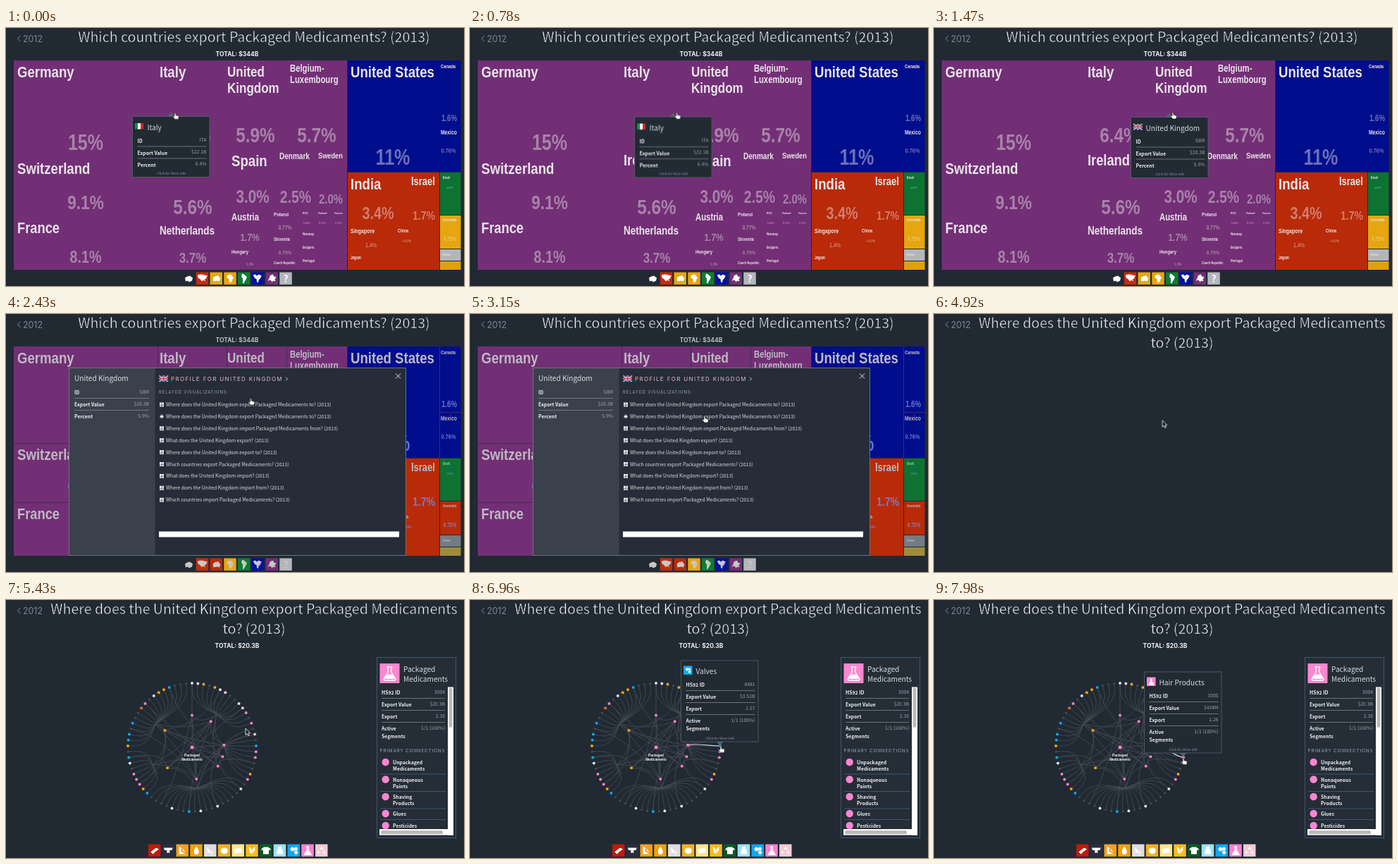
Animation of 650 by 366 pixels, one loop 8 s. Source, as an HTML page:

```html
<!DOCTYPE html>
<html lang="en">
<head>
<meta charset="utf-8">
<title>Which countries export Packaged Medicaments?</title>
<style>
  html, body { margin: 0; width: 100%; height: 100%; overflow: hidden; background: #212a33; }
  svg { display: block; width: 100vw; height: 100vh; }
  text { font-family: "Noto Sans CJK JP", "Noto Sans CJK", "Noto Sans CJK SC", sans-serif; font-weight: 300; fill: #d6dade; }
  /* a background-coloured outline slims the strokes to a light weight */
  .heading { fill: #f4f5f7; stroke: #212a33; stroke-width: .5px; }
  .bold { font-weight: 700; font-size: 6.9px; fill: #eef0f2; }
  .value { font-size: 6.8px; fill: #9ba2aa; }
  .caps { font-family: Inter, sans-serif; font-weight: 400; }
  .total { font-family: Inter, sans-serif; font-weight: 700; font-size: 8.5px; fill: #f1f2f4; }
  .cond { font-family: "Liberation Sans", Arial, sans-serif; font-weight: 700; fill: #e9e4ea; }
  #lit .cond { fill: #bdb9c2; }
  #lit .shares .cond { fill: #7d8ee6; }
  #lit .total { fill: #b9bdc2; }
  .anim { animation: 8s step-end infinite; }
  .smooth { animation: 8s linear infinite; }

  #map { animation-name: map; }
  #lit { animation-name: lit; }
  #modal { animation-name: modal; }
  #titleA { animation-name: titleA; }
  #titleB { animation-name: titleB; }
  #net { animation-name: net; }
  #tipItaly { animation-name: italy; }
  #tipUK { animation-name: uk; }
  #tipValves { animation-name: valves; }
  #tipHair { animation-name: hair; }
  #tips { animation-name: follow; }
  #cursor { animation-name: cursor; }
  #hand { animation-name: hand; }
  #arrow { animation-name: arrow; }

  @keyframes map { 0% { visibility: visible } 24.5%, 100% { visibility: hidden } }
  @keyframes lit { 0% { visibility: hidden } 24.5% { visibility: visible } 43%, 100% { visibility: hidden } }
  @keyframes modal { 0%, 24.5% { opacity: 0 } 27%, 42.99% { opacity: 1 } 43%, 100% { opacity: 0 } }
  @keyframes titleA { 0% { visibility: visible } 43%, 100% { visibility: hidden } }
  @keyframes titleB { 0% { visibility: hidden } 43%, 100% { visibility: visible } }
  @keyframes net { 0%, 62% { opacity: 0 } 66%, 100% { opacity: 1 } }
  @keyframes italy { 0% { visibility: visible } 11.4%, 100% { visibility: hidden } }
  @keyframes uk { 0% { visibility: hidden } 11.4% { visibility: visible } 24.5%, 100% { visibility: hidden } }
  @keyframes valves { 0% { visibility: hidden } 80% { visibility: visible } 92.5%, 100% { visibility: hidden } }
  @keyframes hair { 0% { visibility: hidden } 93.5%, 100% { visibility: visible } }
  @keyframes follow {
    0%, 4% { transform: translate(0, 0); animation-timing-function: ease-in-out }
    15%, 100% { transform: translate(100px, 1px) }
  }
  @keyframes cursor {
    0%, 4% { transform: translate(239px, 119.5px); animation-timing-function: ease-in-out }
    15%, 26% { transform: translate(338px, 119px); animation-timing-function: ease-in-out }
    30%, 32% { transform: translate(346.5px, 119px); animation-timing-function: ease-in-out }
    38%, 42% { transform: translate(332px, 144px); animation-timing-function: ease-in-out }
    46%, 60% { transform: translate(322.5px, 147.5px); animation-timing-function: ease-in-out }
    67%, 74% { transform: translate(340px, 182px); animation-timing-function: ease-in-out }
    80%, 91% { transform: translate(355px, 206.5px); animation-timing-function: ease-in-out }
    94%, 100% { transform: translate(353px, 223.5px) }
  }
  @keyframes hand { 0% { visibility: visible } 43% { visibility: hidden } 80%, 100% { visibility: visible } }
  @keyframes arrow { 0% { visibility: hidden } 43% { visibility: visible } 80%, 100% { visibility: hidden } }
</style>
</head>
<body>
<svg id="stage" viewBox="0 0 650 366"></svg>
<script>
const rect = (x, y, w, h, fill, extra = "") =>
  `<rect x="${x}" y="${y}" width="${w}" height="${h}" fill="${fill}" ${extra}/>`;
const text = (x, y, size, str, extra = "") =>
  `<text x="${x}" y="${y}" font-size="${size}" ${extra}>${str}</text>`;
const dot = (x, y, r, fill) => `<circle cx="${x}" cy="${y}" r="${r}" fill="${fill}"/>`;
const path = (d, extra = "") => `<path d="${d}" ${extra}/>`;
const group = (id, cls, body) => `<g id="${id}" class="${cls}">${body}</g>`;
const at = (x, y, body) => `<g transform="translate(${x} ${y})">${body}</g>`;
const cond = (x, y, size, str, extra = "") =>
  `<text class="cond" transform="translate(${x} ${y}) scale(.81 1)" font-size="${size}" ${extra}>${str}</text>`;
const MID = 'text-anchor="middle"', END = 'text-anchor="end"';

// Headings
const year = path("M20.5 11l-4 4 4 4", 'fill="none" stroke="#87909a"') +
  text(24, 20, 12.4, "2012", 'class="caps" style="fill:#7b8590"');
const heading = lines =>
  lines.map((line, i) => text(352, 20 + 28 * i, 19.6, line, MID + ' class="heading"')).join("");
const total = (y, amount) => `<text class="total" x="328" y="${y}" ${MID}>TOTAL: ${amount}</text>`;

// Treemap
const names = {
  europe: [["Germany", 16, 70, 23], ["Switzerland", 16, 207, 23], ["France", 16, 291, 22.6], ["Italy", 218, 70, 23],
    ["Ireland", 218, 195, 22.6], ["Netherlands", 218, 293, 16.7], ["United", 314, 69, 21], ["Kingdom", 314, 92, 21],
    ["Belgium-", 403, 62, 14], ["Luxembourg", 403, 78, 14], ["Spain", 320, 196, 23], ["Denmark", 388, 186, 12.4],
    ["Sweden", 443, 185, 11.4], ["Austria", 320, 273, 14], ["Hungary", 320, 320, 7.3], ["Poland", 380, 267, 7.8],
    ["Slovenia", 380, 302, 6.9], ["Czech Republic", 380, 335, 5.1], ["ROU", 421, 264, 4.3], ["Finland", 443, 264, 4.3],
    ["Greece", 466, 264, 4.3], ["Norway", 421, 294, 5.6], ["Bulgaria", 421, 313, 5], ["Portugal", 421, 332, 5.2]],
  others: [["United States", 489, 70, 23], ["Canada", 617, 57, 7.2], ["Mexico", 617, 151, 8.3], ["India", 489, 229, 23],
    ["Israel", 575, 223, 16], ["Singapore", 489, 291, 8.6], ["China", 556, 290, 6.7], ["Japan", 489, 328, 6.4],
    ["Brazil", 620, 214, 4.6], ["Australia", 620, 274, 5.6], ["Korea", 620, 323, 4.6]]
};
const shares = {
  europe: [["15%", 113, 173, 31], ["9.1%", 113, 257, 28], ["8.1%", 113, 333, 24.4], ["6.4%", 263, 162, 30],
    ["5.6%", 265, 264, 30], ["3.7%", 265, 333, 21], ["5.9%", 354, 162, 30], ["5.7%", 441, 162, 30],
    ["3.0%", 350, 248, 25.5], ["2.5%", 411, 248, 24], ["2.0%", 461, 249, 18.4], ["1.7%", 346, 302, 14.6],
    ["1.1%", 346, 337, 5.5], ["0.77%", 396, 286, 8.3], ["0.74%", 396, 321, 8], ["0.44%", 427, 278, 4.4],
    ["0.33%", 449, 278, 4.4], ["0.32%", 472, 278, 4.4]],
  others: [["11%", 549, 194, 31], ["1.6%", 629, 132, 12], ["0.76%", 628, 177, 9.1], ["3.4%", 528, 271, 24.4],
    ["1.7%", 593, 272, 17.3], ["1.4%", 518, 311, 8.7], ["0.51%", 569, 304, 5.2], ["0.47%", 630, 228, 4],
    ["0.72%", 630, 302, 8.2]]
};
const normal = { ocean: "#e6a60f", grey: "#b3b6bc", gold: "#dfa010", glyph: "#fff", share: .46 };
const dimmed = { ocean: "#b92a08", grey: "#737b84", gold: "#a08b3c", glyph: "#c6c7ca", share: .8 };

function treemap(c, seams) {
  const areas = [[11, 46, 473, 297, "#722f75"], [485, 46, 160.5, 158, "#000d8c"], [485, 205, 130, 138, "#b92a08"],
    [616, 205, 29.5, 60, "#0e7332"], [616, 266, 29.5, 47, c.ocean], [616, 314, 29.5, 16, c.grey], [616, 331, 29.5, 12, c.gold]];
  const all = set => [...set.europe, ...set.others];
  return total(40, "$344B") + areas.map(a => rect(...a)).join("") +
    path(seams, 'stroke="#472a55" fill="none"') +
    all(names).map(([n, x, y, s]) => cond(x, y, s, n)).join("") +
    `<g class="shares" opacity="${c.share}">${all(shares).map(([p, x, y, s]) => cond(x, y, s, p, MID)).join("")}</g>`;
}
const cellSeams = "M11 183.5H215M11 267.5H215M215.5 46V343M313.5 46V343M398.5 46V171M215 171.5H484M215 273.5H313M615.5 46V204M616 139.5H645";

// Icon strips
const tileRow = (x0, glyph, tiles) => tiles.map(([fill, d], i) =>
  at(x0 + 19.75 * i, 346.5, rect(0, 0, 17.5, 17.5, fill) + path(d, `fill="${glyph}"`))).join("");
const flask = "M7 3h4v1l-.6.5v3.5l4 6q.4 1.5-1 1.5H4.6q-1.4 0-1-1.5l4-6V4.5L7 4z";
const gears = "M7 4a3 3 0 1 0 .1 0zM12 4a2.4 2.4 0 1 0 .1 0zM12 9a2.7 2.7 0 1 0 .1 0z";
const regions = c => tileRow(250, c.glyph, [
  ["#212a33", "M4 8l3-2 4-1 4 3-1 4-4 2-2-2-3 1z"],
  ["#c92a08", "M2 4l6-1 8 2-2 4-2 1 1 3-3-2-2 2-2-3-3-2z"],
  [c.ocean, "M4 8l4-3 1 1 2-2 4 5-2 4-3-1-5 1z"],
  ["#eaa50c", "M5 4l5-1 4 5-2 2-1 4-3 1-1-6-3-1z"],
  ["#0e7d35", "M6 2l3 1 4 4-2 4-3 5-1-1V9L5 6z"],
  ["#0512a0", "M2 4l3-1 2 2 3-2 4 2-2 4-2 2-1 4-2-2 0-3-3-2z"],
  ["#722f75", "M3 12l2-3 1-4 4-2 2 3 3 1-2 3 1 3-3-1-2 2-2-3z"],
  ["#b3b6bc", ""]]) + text(397, 361, 14, "?", `${MID} style="font-weight:700;fill:${c.glyph}"`);
const sectors = tileRow(202, "#fff", [
  ["#bd1d0b", "M3 11l8-6 4 2-8 6zM4 12l3 2 1-1z"],
  ["#2c2c3f", "M2 5h13l-1 3-4 1 1 3H6l1-3-4-1z"],
  ["#f0a020", "M4 4h3v6l6 4H4zM8 5l5 6-3-1z"],
  ["#eda010", "M9 3q5 7 3 10-3 3-6 0-2-4 3-10z"],
  ["#dededf", "M4 4l9 9-1 1-4-3-3 2z"],
  ["#f3b11e", "M4 7q5-4 10 0 1 6-5 7-6-1-5-7z"],
  ["#ffe58c", "M3 7l9-2 3 3-2 4-9 1z"],
  ["#f5bd1c", "M4 4l4 2 1 8-3-2zM13 3l-4 5 1 5 3-4z"],
  ["#075a26", "M6 4h6l4 3-2 2-1-1v6H5V8L4 9 2 7z"],
  ["#9de0f0", "M7 3h4l1 3 2 8H4l2-8z"],
  ["#0ba8f5", gears],
  ["#fb82cf", flask],
  ["#f6cbd3", "M9 3l3 4H6zM4 8l2 5H3zM13 8l2 5h-4z"]]);

// Flags
const flagItaly = rect(0, 0, 4, 8.5, "#14904a") + rect(4, 0, 4, 8.5, "#fff") + rect(8, 0, 4, 8.5, "#d5282f");
const saltire = "M0 0L12.5 8.5M12.5 0L0 8.5", cross = "M6.25 0V8.5M0 4.25H12.5";
const flagUK = rect(0, 0, 12.5, 8.5, "#223a80") +
  [[saltire, "#fff", 1.5], [saltire, "#d02a3a", .5], [cross, "#fff", 2.6], [cross, "#d02a3a", 1.4]]
    .map(([d, color, w]) => path(d, `stroke="${color}" stroke-width="${w}"`)).join("");

// Label/value rows, separated by rules
function rows(x, right, y, list) {
  return list.map(([label, value], n) => {
    const lines = label.split("\n");
    let out = text(right, y - 1.5, 6.8, value, `class="value" ${END}`);
    lines.forEach((line, i) => out += `<text class="bold" x="${x}" y="${y + 11 * i}">${line}</text>`);
    y += 11 * (lines.length - 1) + 17;
    return out + (n < list.length - 1 ? path(`M${x} ${y - 11.5}H${right}`, 'stroke="#7c858f" stroke-width=".8"') : "");
  }).join("");
}

function tooltip(x, y, h, icon, title, list, caret) {
  return path(caret, 'fill="#59636e"') +
    rect(x, y, 109.5, h, "#222a33", 'stroke="#56616d" stroke-width=".8"') +
    icon + text(x + 21, y + 19, 10.1, title) + rows(x + 7, x + 105, y + 37, list) +
    text(x + 55, y + h - 3.5, 4.9, "Click for More Info", MID + ' font-style="italic" style="fill:#8c98a6"');
}
const countryTip = (flag, title, id, value, percent) =>
  tooltip(179.5, 125.5, 86, at(183, 135, flag), title,
    [["ID", id], ["Export Value", value], ["Percent", percent]], "M229 125l5.5-5 5.5 5z");
const productTip = (x, y, fill, glyph, title, id, value, ratio) =>
  tooltip(x, y, 115, at(x + 3.5, y + 7.5, rect(0, 0, 12.5, 12.5, fill) +
    `<g transform="scale(.71)">${path(glyph, 'fill="#fff"')}</g>`), title,
    [["HS92 ID", id], ["Export Value", value], ["Export", ratio], ["Active\nSegments", "1/1 (100%)"]],
    `M${x + 50} ${y + 115}l5 5 5-5z`);

// Country dialog
const uk = "the United Kingdom", meds = "Packaged Medicaments";
const related = [`Where does ${uk} export ${meds} to?`, `Where does ${uk} export ${meds} to?`,
  `Where does ${uk} import ${meds} from?`, `What does ${uk} export?`, `Where does ${uk} export to?`,
  `Which countries export ${meds}?`, `What does ${uk} import?`, `Where does ${uk} import from?`,
  `Which countries import ${meds}?`];
const bullet = i => i === 1
  ? path("M0 3h6M3 0v6M1 1l4 4M5 1L1 5", 'stroke="#fff" stroke-width=".8"') + dot(3, 3, 1.7, "#fff")
  : rect(0, 0, 6, 6, "#e8eaec") + path("M3 0V6M3 3.5H6M0 4H3", 'stroke="#343b46" stroke-width=".6"');
const modal = rect(89.5, 76.5, 478, 266, "#272d38", 'stroke="#68727d"') + rect(90, 77, 121.5, 265, "#3b414c") +
  text(97, 95, 10.1, "United Kingdom") +
  rows(97, 203, 114, [["ID", "GBR"], ["Export Value", "$20.3B"], ["Percent", "5.9%"]]) +
  at(217.5, 87.5, flagUK) +
  text(234, 95, 8, "PROFILE FOR UNITED KINGDOM", 'class="caps" letter-spacing="1.35" style="fill:#dcbccd"') +
  path("M397 89.5l2.5 2.5-2.5 2.5", 'fill="none" stroke="#d5d8dc" stroke-width=".9"') +
  path("M553 84.5l7 7M560 84.5l-7 7", 'stroke="#e4e6e8"') +
  text(217, 113, 6.1, "RELATED VISUALIZATIONS", 'class="caps" letter-spacing=".85" style="fill:#93a3b6"') +
  related.map((q, i) => at(218, 125.5 + 16.9 * i, bullet(i)) +
    text(227, 131 + 16.9 * i, 6.85, q + " (2013)")).join("") +
  rect(217, 308.5, 341, 8, "#fff");

// Product network
const hues = { w: "#e4dcea", o: "#f2a31b", p: "#f884ca", k: "#f7c5dc", b: "#12a4ef", r: "#e06a1c", ".": "#454d56" };
const ring = [..."wwo.owk..wkp.p.k.bpp..op.w....w..w.b..w....boppp.wb.obb.b..rp.woob..."];
const polar = (deg, r) => [264 + r * Math.sin(deg * Math.PI / 180), 209 - r * Math.cos(deg * Math.PI / 180)].map(v => +v.toFixed(1));
const outer = (i, r = 91) => polar(i * 360 / ring.length, r);
const primaries = [[0, "p"], [36, "p"], [86, "p"], [107, "p"], [126, "p"], [172, "p"], [230, "o"], [302, "o"]]
  .map(([deg, hue]) => ({ pos: polar(deg, 45.5), hue }));
// Each bundle point gathers a run of outer nodes
const bundles = [[212, 176, 52, 69], [299, 162, 0, 14], [309, 206, 14, 24], [272, 267, 24, 43], [208, 234, 43, 52]];
const bend = ([ax, ay], [bx, by]) => `M${ax} ${ay}Q${(ax + bx + 264) / 3} ${(ay + by + 209) / 3} ${bx} ${by}`;
let links = "";
bundles.forEach(([x, y, from, to], b) => {
  for (let i = from; i < to; i++) links += `M${outer(i)}C${outer(i, 74)} ${outer(i, 62)} ${x} ${y}`;
  primaries.forEach((p, j) => { if ((b + j) % 2) links += bend([x, y], p.pos); });
});
primaries.forEach(p => links += `M264 209L${p.pos}`);
for (let i = 0; i < ring.length; i += 5)
  links += `M${outer(i)}C${outer(i, 70)} ${outer(i, 40)} ${primaries[(i * 3) % 8].pos}`;

const network = path(links, 'fill="none" stroke="#4a4f59" stroke-width=".8"') +
  ring.map((h, i) => dot(...outer(i), h === "." ? 1.5 : 2, hues[h])).join("") +
  primaries.map(p => dot(...p.pos, 2, hues[p.hue])).join("") + dot(264, 209, 2.5, hues.p) +
  ["Packaged", "Medicaments"].map((line, i) => cond(264, 221.5 + 6 * i, 5.8, line,
    MID + ' style="fill:#fff;stroke:#212a33;stroke-width:1;paint-order:stroke"')).join("");
const spoke = i => path(`M${primaries[2].pos}C325 203 ${outer(i, 75)} ${outer(i)}`, 'fill="none" stroke="#c9cdd3" stroke-width="1.2"') +
  dot(...primaries[2].pos, 2, hues.p) + dot(...outer(i), 2.2, hues[ring[i]]);

const connections = [["Unpackaged\nMedicaments", 230], ["Nonaqueous\nPaints", 254.5], ["Shaving\nProducts", 279], ["Glues", 303], ["Pesticides", 320]];
const panel = rect(526.5, 81.5, 112, 256, "#252d37", 'stroke="#455b79" stroke-width=".9"') +
  rect(530.5, 90, 28, 28, "#fb87cf") +
  `<g transform="translate(530.5 90) scale(1.55)">${path(flask, 'fill="none" stroke="#fff" stroke-width=".9"')}${path("M6 10h6l2 4H4z", 'fill="#fff"')}</g>` +
  text(564, 102, 10.1, "Packaged") + text(564, 115.5, 10.1, "Medicaments") +
  rows(533, 623, 134, [["HS92 ID", "3004"], ["Export Value", "$20.3B"], ["Export", "2.35"], ["Active\nSegments", "1/1 (100%)"]]) +
  text(530.5, 216, 6.4, "PRIMARY CONNECTIONS", 'class="caps" letter-spacing=".8" style="fill:#99a2ad"') +
  connections.map(([name, y]) => {
    const lines = name.split("\n");
    return dot(538.7, y, 5.2, "#fb87cf") +
      lines.map((l, i) => `<text class="bold" x="549" y="${y + 3 + 9 * i}">${l}</text>`).join("") +
      path(`M531 ${y + 8.5 * lines.length}H624`, 'stroke="#41648e" stroke-width=".8"');
  }).join("") +
  rect(627, 123.5, 8, 210, "#fff") + rect(530, 325, 105, 8.5, "#fff") +
  rect(628.5, 124.5, 5, 56, "#bbb", 'rx="2"') + rect(532, 327, 88, 5, "#bbb", 'rx="2"');

// Pointers
const hand = path("M0 .5q1.3-.8 1.6.8l.6 3 3.3.8q1 .4.8 1.7l-.6 3.2H.8L-2.5 6q.2-1.3 1.7-.5l.8.7z",
  'fill="#fff" stroke="#15191e" stroke-width=".7"');
const arrow = path("M0 0v9.5l2.2-2 1.5 3.3 1.5-.7-1.5-3.2h2.9z", 'fill="#15191e" stroke="#fff" stroke-width=".8"');

document.getElementById("stage").innerHTML =
  rect(0, 0, 650, 366, "#212a33") + year +
  group("titleA", "anim", heading(["Which countries export Packaged Medicaments? (2013)"])) +
  group("map", "anim", treemap(normal, "") + regions(normal)) +
  group("lit", "anim", treemap(dimmed, cellSeams) + regions(dimmed)) +
  group("tips", "smooth",
    group("tipItaly", "anim", countryTip(flagItaly, "Italy", "ITA", "$22.1B", "6.4%")) +
    group("tipUK", "anim", countryTip(flagUK, "United Kingdom", "GBR", "$20.3B", "5.9%"))) +
  group("modal", "smooth", modal) +
  group("titleB", "anim", heading(["Where does the United Kingdom export Packaged Medicaments", "to? (2013)"])) +
  group("net", "smooth", total(68, "$20.3B") + network + panel + sectors) +
  group("tipValves", "anim", spoke(17) + productTip(299.5, 86, "#0ba8f5", gears, "Valves", "8481", "$3.51B", "1.57")) +
  group("tipHair", "anim", spoke(19) + productTip(298.5, 102, "#fb87cf", flask, "Hair Products", "3305", "$434M", "1.26")) +
  group("cursor", "smooth", group("hand", "anim", hand) + group("arrow", "anim", arrow));
</script>
</body>
</html>
```
